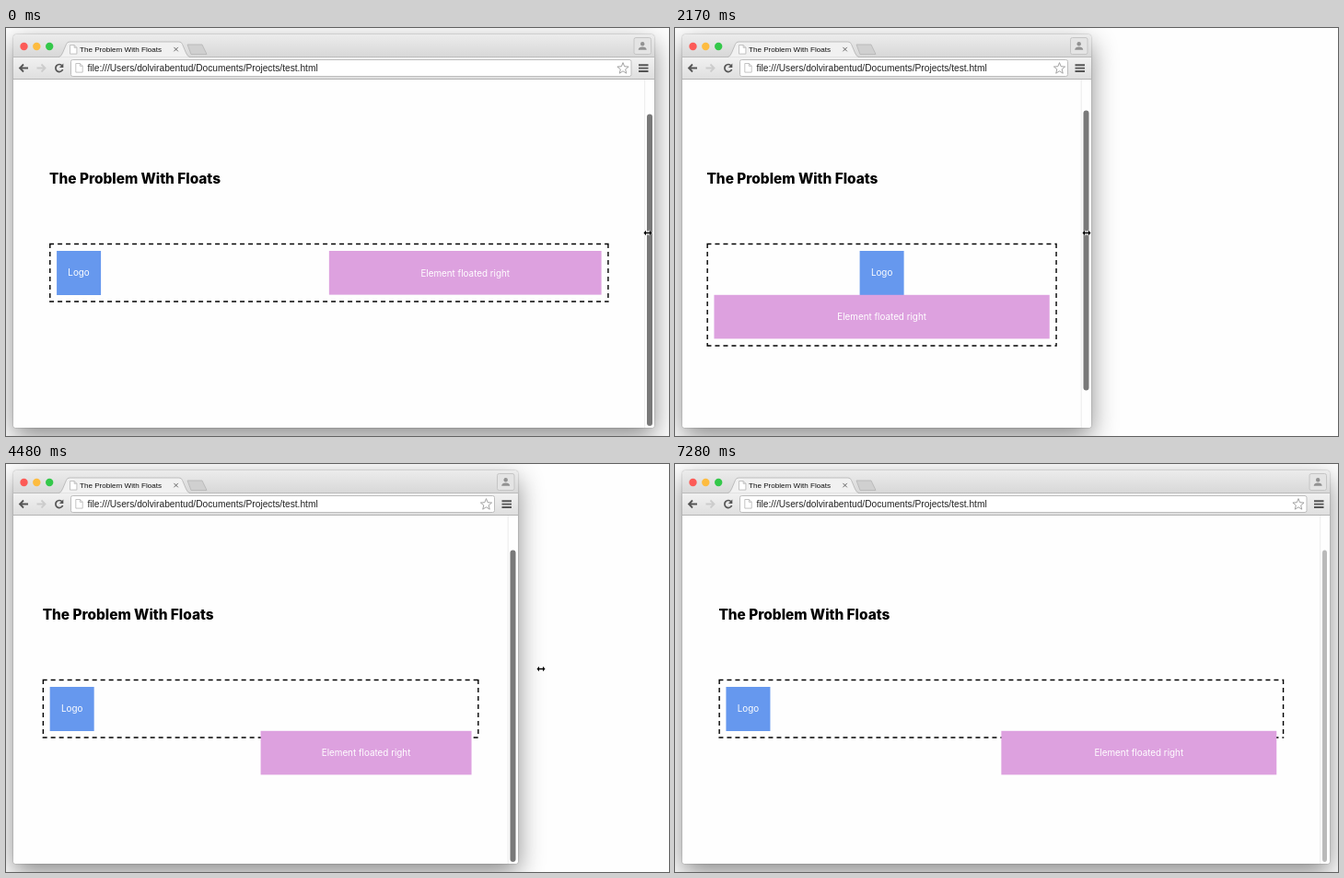
Recreate the animation shown at these times as an HTML page. Size 720 by 443 pixels, loop 7.35 s.

```html
<!DOCTYPE html>
<html lang="en">
<head>
<meta charset="utf-8">
<title>The Problem With Floats</title>
<style>
  html, body { margin: 0; width: 100%; height: 100%; overflow: hidden; background: #fefefe; }
  #window {
    position: absolute; left: 8px; top: 7px; height: 427px; border-radius: 4px 4px 3px 3px;
    background: linear-gradient(#ececec 0, #d8d8d8 24px, #bcbcbc 24px, #bcbcbc 25px, #f1f1f1 25px,
      #dfdfdf 48px, #b4b4b4 48px, #b4b4b4 49px, #fefefe 49px);
    box-shadow: 0 10px 28px rgba(0, 0, 0, .46), 0 0 1.5px rgba(0, 0, 0, .45);
  }
  svg { position: absolute; left: 0; top: 0; }
  text { font-family: Inter, sans-serif; }
  #url {
    position: absolute; left: 88.4px; top: 36px; font: 10.2px/15px "Liberation Sans", Arial, sans-serif;
    color: #222; white-space: nowrap; overflow: hidden; text-overflow: ellipsis;
  }
  .label { font-size: 9.85px; fill: #fff; text-anchor: middle; }
  #heading { font-size: 15.4px; font-weight: 800; }
  #title { font: 8.1px "Liberation Sans", Arial, sans-serif; }
</style>
</head>
<body>
<div id="window"></div>
<svg width="720" height="443" viewBox="0 0 720 443" fill="none">
  <defs>
    <path id="file" d="M0 0H4.6L7.4 2.8V9.6H0Z M4.6 0V2.8H7.4" stroke="#b5b5b5" stroke-width=".8" fill="#fff"/>
    <path id="back" d="M9.5 0H.5M4.5 -4L.5 0L4.5 4" stroke-width="1.8"/>
  </defs>

  <!-- tab strip -->
  <circle cx="19.5" cy="20" r="4.2" fill="#fc5b57"/>
  <circle cx="33.3" cy="20" r="4.2" fill="#fdbc40"/>
  <circle cx="47.2" cy="20" r="4.2" fill="#34c84a"/>
  <path d="M57 31.7Q60 31 61.5 27L65.5 17.5Q66.5 15 69 15H188Q190.5 15 191.5 17.5L195.5 27Q197 31 200 31.7"
    fill="#f1f1f1" stroke="#b8b8b8" stroke-width=".9"/>
  <path d="M197 18H213L218 28.5H201Z" fill="#d0d0d0" stroke="#b4b4b4" stroke-width=".8" stroke-linejoin="round"/>
  <use href="#file" x="69.5" y="18.5"/>
  <text id="title" x="80" y="26.3" fill="#111">The Problem With Floats</text>
  <path d="M182.4 20.9l4.4 4.4m0-4.4l-4.4 4.4" stroke="#666"/>

  <!-- toolbar -->
  <use href="#back" x="14.5" y="43.5" stroke="#555"/>
  <use href="#back" transform="translate(43 43.5) scale(-1 1)" stroke="#ccc"/>
  <path d="M61 41A4 4 0 1 0 61.6 45" stroke="#555" stroke-width="1.7"/>
  <path d="M62.3 38.6V43H57.9Z" fill="#555"/>
  <rect id="field" x="70.5" y="34.5" height="18" rx="2" fill="#fff" stroke="#bdbdbd"/>
  <use href="#file" x="75.8" y="38.5"/>
  <g id="right">
    <path id="star" stroke="#999" stroke-width=".9" fill="#fff"/>
    <path d="M-17 40.2h10.5m-10.5 3.4h10.5m-10.5 3.4h10.5" stroke="#555" stroke-width="1.9"/>
    <rect x="-22" y="10.5" width="18.5" height="18" rx="2" fill="#e4e4e4" stroke="#c2c2c2" stroke-width=".9"/>
    <circle cx="-12.8" cy="17.3" r="2.2" fill="#929292"/>
    <path d="M-17.3 23.7Q-17 20.4 -12.8 20.4T-8.3 23.7Z" fill="#929292"/>
    <path d="M-10.3 56V434" stroke="#e6e6e6" stroke-width=".8"/>
    <rect id="thumb" x="-8" rx="3"/>
  </g>

  <!-- page -->
  <text id="heading" y="168.5" fill="#000">The Problem With Floats</text>
  <path id="dashes" stroke="#000" stroke-width="1.4" stroke-dasharray="5 4"/>
  <rect id="logo" y="242" width="48" height="48" fill="#6698ee"/>
  <text id="logoText" class="label" y="269">Logo</text>
  <rect id="float" height="47.6" fill="#dda1df"/>
  <text id="floatText" class="label">Element floated right</text>

  <!-- pointers -->
  <path id="resize" d="M-4.5 0L-2 -2.7V-.8H2V-2.7L4.5 0L2 2.7V.8H-2V2.7Z M0 -2.5V2.5"
    fill="#000" stroke="#fff" paint-order="stroke"/>
  <path id="arrow" d="M0 0V11L2.6 8.7L4.3 12.7L6.1 11.9L4.4 8H8Z" fill="#000" stroke="#fff" stroke-width=".9"/>
</svg>
<div id="url">file:///Users/dolvirabentud/Documents/Projects/test.html</div>

<script>
const LOOP = 7350, STEP = 70, BREAKPOINT = 469;
const GROW = 3290, RELEASE = 6370, IDLE = 6790;

// The drag: the window edge trails the pointer.
const drag = [
  { time: 0, edge: 704, pointer: 697 },
  { time: 1050, edge: 623, pointer: 607 },
  { time: 2170, edge: 451.5, pointer: 447 },
  { time: 2940, edge: 345.5, pointer: 346 },
  { time: GROW, edge: 345.5, pointer: 346 },
  { time: 4480, edge: 555.5, pointer: 581 },
  { time: 5320, edge: 705, pointer: 708 },
  { time: 5880, edge: 709, pointer: 710 },
  { time: 6650, edge: 711, pointer: 707 }
];

const $ = id => document.getElementById(id);
const set = (id, attrs) => {
  for (const name in attrs) $(id).setAttribute(name, attrs[name]);
};
const move = (id, x, y = 0) => set(id, { transform: `translate(${x} ${y})` });
const mix = (a, b, f) => a + (b - a) * f;
const progress = (t, from, to) => Math.min(1, Math.max(0, (t - from) / (to - from)));

function dragAt(t) {
  const i = Math.max(1, drag.findIndex(key => key.time > t));
  const last = drag.length - 1;
  const [a, b] = t >= drag[last].time ? drag.slice(-2) : [drag[i - 1], drag[i]];
  const f = progress(t, a.time, b.time);
  return { edge: mix(a.edge, b.edge, f), pointer: mix(a.pointer, b.pointer, f) };
}

const starPoints = Array.from({ length: 10 }, (_, i) => {
  const r = i % 2 ? 2.8 : 6.4, angle = i * Math.PI / 5;
  return `${-34 + r * Math.sin(angle)} ${44 - r * Math.cos(angle)}`;
});
set('star', { d: `M${starPoints.join('L')}Z` });

function drawBrowser(edge, stacked, released) {
  $('window').style.width = edge - 8 + 'px';
  $('url').style.width = edge - 131 + 'px';
  set('field', { width: edge - 95.5 });
  move('right', edge);
  set('thumb', {
    y: stacked ? 89.5 : 93.5,
    height: stacked ? 304 : 338.5,
    width: released ? 5 : 6,
    fill: released ? '#bababa' : '#797979'
  });
}

function drawPage(edge, stacked, dropped) {
  const width = edge - 18.3;
  const margin = 4.8 + width * 0.05;
  const left = 8 + margin, right = 8 + width - margin;
  const bottom = stacked ? 345 : 297;
  const inner = right - left - 16;
  const logoX = stacked ? (left + right) / 2 - 24 : left + 8;
  const floatWidth = stacked ? inner : inner / 2;
  const floatX = right - 8 - floatWidth;
  const floatY = dropped ? 289.8 : 242;

  set('heading', { x: left });
  set('dashes', {
    d: `M${left} 234.5H${right}M${left} ${bottom}H${right}` +
       `M${left + 0.7} 234V${bottom}M${right - 0.7} 234V${bottom}`
  });
  set('logo', { x: logoX });
  set('logoText', { x: logoX + 24 });
  set('float', { x: floatX, y: floatY, width: floatWidth });
  set('floatText', { x: floatX + floatWidth / 2, y: floatY + 27.5 });
}

function drawPointer(x, t, released) {
  set('resize', { visibility: released ? 'hidden' : 'visible' });
  set('arrow', { visibility: released ? 'visible' : 'hidden' });
  move('resize', x, 222.5);
  const rise = progress(t, RELEASE, 6650), leave = progress(t, IDLE, 7280);
  move('arrow', mix(mix(707, 700, rise), 621, leave), mix(mix(200, 40, rise), -15, leave));
}

function draw(t) {
  const { edge, pointer } = dragAt(t);
  const stacked = edge < BREAKPOINT;
  const released = t >= RELEASE;
  drawBrowser(edge, stacked, released);
  drawPage(edge, stacked, stacked || t > GROW);
  drawPointer(pointer, t, released);
}

const start = performance.now();
function tick() {
  const t = (performance.now() - start) % LOOP;
  draw(Math.floor(t / STEP) * STEP);
  requestAnimationFrame(tick);
}
tick();
</script>
</body>
</html>
```
